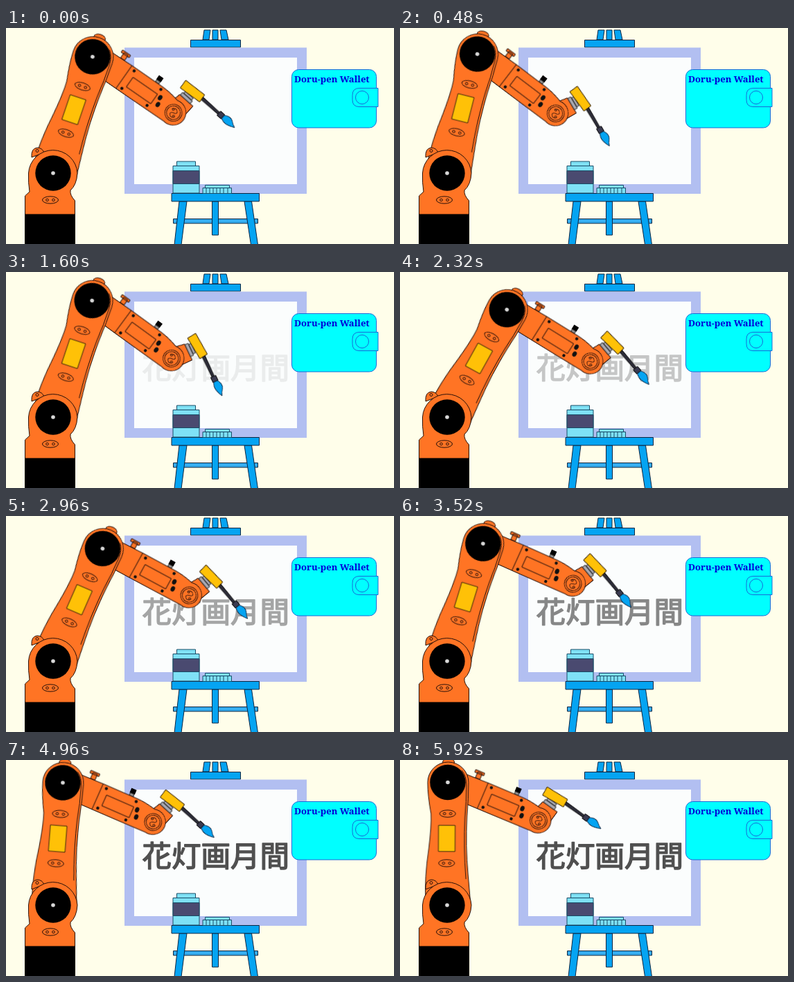
An HTML page for the animation above (6000 ms loop, 560 by 314 pixels).

```html
<!DOCTYPE html>
<html lang="ja">
<head>
<meta charset="utf-8">
<title>Painting robot</title>
<style>
html, body { margin: 0; width: 100%; height: 100%; overflow: hidden; background: #fffeea; }
svg { display: block; width: 100%; height: 100%; }
.blue { fill: #05a4f2; stroke: #0c2440; }
.orange { fill: #ff7424; stroke: #25100a; }
.gold { fill: #ffc107; stroke: #3a260a; }
.glass { fill: #7fe1f6; stroke: #184c66; }
.line { fill: none; stroke: #25100a; }
.wallet { fill: #00ffff; stroke: #1768d8; }
.brand { font: 700 13.1px "Noto Serif", serif; fill: #0000d8; }
.title {
  font: 500 42.5px "Noto Sans CJK JP", "Noto Sans CJK", sans-serif;
  fill: #505050; stroke: #505050; stroke-width: 1.6; stroke-linejoin: round;
}
.upper, .fore, .hand, .title { animation: 6s linear infinite; }
.upper { animation-name: upper; }
.fore { animation-name: fore; }
.hand { animation-name: hand; }
.title { animation-name: appear; }

@keyframes upper {
  0% { transform: rotate(18.6deg); animation-timing-function: ease-in-out; }
  16% { transform: rotate(9.7deg); animation-timing-function: ease-in-out; }
  38.667% { transform: rotate(28.9deg); animation-timing-function: cubic-bezier(.35, .1, .7, .7); }
  58.667% { transform: rotate(16.9deg); }
  68% { transform: rotate(10.3deg); animation-timing-function: cubic-bezier(.3, .4, .7, .8); }
  82.667% { transform: rotate(4.5deg); }
  98.667%, 100% { transform: rotate(.3deg); }
}
@keyframes fore {
  0% { transform: rotate(16.3deg); animation-timing-function: ease-in-out; }
  16% { transform: rotate(30.1deg); animation-timing-function: ease-in-out; }
  38.667% { transform: rotate(3.1deg); animation-timing-function: cubic-bezier(.35, .1, .7, .7); }
  58.667% { transform: rotate(7.3deg); }
  68% { transform: rotate(20.6deg); }
  82.667% { transform: rotate(19.2deg); }
  98.667%, 100% { transform: rotate(22.7deg); }
}
@keyframes hand {
  0% { transform: rotate(7.2deg); animation-timing-function: ease-in-out; }
  16% { transform: rotate(37.5deg); animation-timing-function: ease-in-out; }
  38.667% { transform: rotate(18deg); animation-timing-function: cubic-bezier(.35, .1, .7, .7); }
  58.667% { transform: rotate(26.5deg); }
  68% { transform: rotate(19.5deg); }
  82.667% { transform: rotate(19deg); }
  98.667%, 100% { transform: rotate(12.8deg); }
}
@keyframes appear {
  0%, 21.7% { opacity: 0; }
  76%, 100% { opacity: 1; }
}
</style>
</head>
<body>
<svg viewBox="0 0 560 314" preserveAspectRatio="none">
  <defs>
    <g id="slot">
      <ellipse class="orange" rx="11.500" ry="5.200"/>
      <circle class="line" cx="-4.500" r="1.800"/>
      <circle class="line" cx="4.500" r="1.800"/>
    </g>
    <g id="disc">
      <circle r="25.7" fill="#000"/>
      <circle r="2.8" fill="#d8d8d8"/>
    </g>
  </defs>
  <rect width="560" height="314" fill="#fffeea"/>

  <!-- easel -->
  <g class="blue">
    <path d="M286 3h9l-2 14h-9zM298 3h8v14h-8zM309 3h9l3 14h-10z"/>
    <path d="M266.500 17.500h72v10.500h-72z"/>
    <path d="M241.500 277.500h122v6.500h-122z" fill="#35adf0"/>
    <path d="M297.500 252h9v49h-9z"/>
    <path d="M250 252h11l-8 63h-10zM344 252h10.500l9 63h-10z"/>
  </g>
  <path fill="#b2bff1" d="M171 28.500h263v212.500h-263z"/>
  <path fill="#fbfdfd" d="M185 43h235v184h-235z"/>
  <path class="blue" d="M239 240.500h126.500v11.500h-126.500z"/>
  <text class="title" x="196.500" y="155">花灯画月間</text>

  <!-- paint jar and palette -->
  <g class="glass">
    <path d="M246.500 194h27v6.500h-27zM241 200.500h38v39.500h-38z"/>
    <path d="M241 207.500h38v19h-38z" fill="#4a4a70"/>
    <path d="M287.500 228.500h35v4h-35zM284 232.500h41.500v8h-41.500z"/>
    <path d="M289 232.500v8m5-8v8m5-8v8m5-8v8m5-8v8m5-8v8m6-8v8"/>
  </g>

  <!-- wallet -->
  <g class="wallet">
    <rect x="412.500" y="60.500" width="122" height="84.500" rx="10"/>
    <path d="M537 87.500v27h-27q-10 0-10-10v-7q0-10 10-10z"/>
    <circle cx="514" cy="101" r="9.500"/>
  </g>
  <text class="brand" x="416" y="79.300">Doru-pen Wallet</text>

  <!-- robot -->
  <g transform="translate(68 211)">
    <g class="upper">
      <g transform="translate(0 -178.500)">
        <g class="fore">
          <g transform="translate(142.300 0)">
            <g class="hand">
              <path class="orange" d="M-15 0L-11-26H14.500V-6L8 10z"/>
              <path fill="#a9a9b2" stroke="#333" d="M-8-35H7v4H-8zM-10-31H9v5H-10z"/>
              <path fill="#2d2d3a" stroke="#111" d="M17-45.500L51-45V-41.500L17-41z"/>
              <path class="gold" d="M-18.500-47L16-49.500L17.500-37L-17-33.500z"/>
              <path fill="#3b3b50" stroke="#111" d="M49-47.500h8v8h-8z"/>
              <path class="blue" d="M57-46.500Q65-52 71-48Q76-44 80-43.300Q70-38 64-38.500Q60-39 57-40.500z"/>
            </g>
          </g>
          <path class="orange" d="M34-31h7v9h-7zM30-33h14v4H30z"/>
          <path d="M94-33h8v7h-8z"/>
          <path fill="#999" stroke="#222" d="M95-26h6v4h-6z"/>
          <path class="orange" d="M15-21L54-22H108Q120-22 137-18A18.500 18.500 0 1 1 138 18L54 18.500H15z"/>
          <path class="line" d="M54-22V18.500M65-9H108V8H65z"/>
          <g fill="#111">
            <circle cx="61" cy="-17.500" r="2.200"/>
            <circle cx="61" cy="13.500" r="2.200"/>
            <circle cx="108" cy="-17.500" r="2.200"/>
            <circle cx="105" cy="13" r="2.200"/>
            <ellipse cx="114" cy="-7" rx="3" ry="4"/>
            <ellipse cx="117" cy="3" rx="3" ry="4"/>
          </g>
          <g class="line" transform="translate(142.300 0)">
            <circle r="12.500"/>
            <circle r="10"/>
            <path d="M-5-4Q0-9 4-4Q5 0 0 0Q-5 1-3 5Q1 9 5 4"/>
            <circle cx="-3" cy="-4" r="1.500"/>
            <circle cx="3" cy="4" r="1.500"/>
          </g>
        </g>
      </g>
      <ellipse class="orange" cx="1" cy="-208" rx="8.500" ry="5"/>
      <path class="orange" d="M-31-5Q-33-40-27-81Q-23-115-24-133Q-29-160-29-178.500A29.500 29.500 0 0 1 30-178.500Q30-155 28-130Q26-85 30-45L34 0z"/>
      <path class="line" d="M20-196Q27-188 27-174Q27-150 25-128Q23-85 27-38"/>
      <use href="#disc" y="-178.500"/>
      <use href="#slot" y="-133"/>
      <path class="gold" d="M-13-116H11V-78H-13z"/>
      <use href="#slot" x="-1" y="-61"/>
    </g>
  </g>
  <path class="orange" d="M37 188Q36 175 45 174Q52 174 55 181z"/>
  <circle class="line" cx="45" cy="178.500" r="2"/>
  <path class="orange" d="M27.500 272V244L34 238Q32 225 32.500 211A35.300 35.300 0 0 1 103 211Q102 228 93 236Q92 243 99.500 251V272z"/>
  <use href="#disc" x="68" y="211"/>
  <use href="#slot" x="64" y="250"/>
  <path d="M27 270.500h73v44H27z"/>
</svg>
</body>
</html>
```
